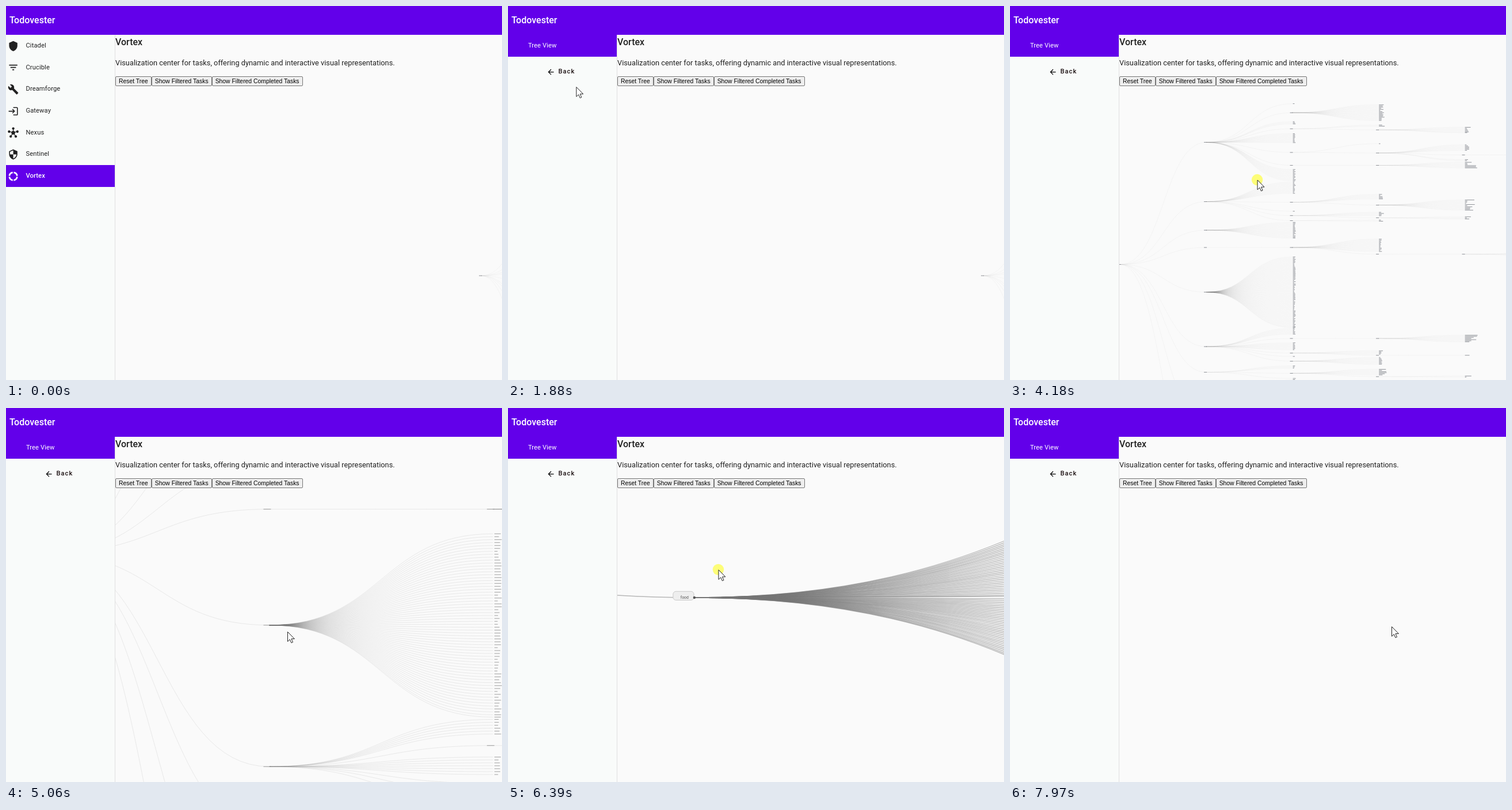
An HTML page with a canvas that plays this animation: 862x649 px, repeating every 8 s.

```html
<!DOCTYPE html>
<html lang="en">
<head>
<meta charset="utf-8">
<title>Task tree</title>
<style>
html, body { margin: 0; width: 862px; height: 649px; overflow: hidden; background: #fafafa; }
body { position: relative; font: 12.8px Roboto, sans-serif; color: #212121; }
header { height: 50px; background: #6200ea; color: #fff; font-weight: 500; font-size: 16px; line-height: 50px; padding-left: 6px; box-sizing: border-box; }
aside { position: absolute; top: 50px; left: 0; width: 189px; height: 599px; background: #f9fbfa; border-right: 1px solid #e0e0e0; font-size: 11.2px; letter-spacing: .08px; }
.row { height: 37.7px; line-height: 37.7px; padding-left: 34.5px; position: relative; }
.row svg { position: absolute; left: 3px; top: 9.5px; width: 19.2px; height: 19.2px; fill: currentColor; }
.on { background: #6200ea; color: #fff; font-weight: 500; }
#submenu .on { font-weight: 400; padding-left: 35px; }
#back { position: absolute; left: 87.5px; top: 57px; font-weight: 500; letter-spacing: 1px; line-height: 14px; color: #1c1112; }
#back svg { position: absolute; left: -21px; top: 0; width: 15px; height: 15px; }
h1, p, nav { position: absolute; left: 190px; margin: 0; white-space: nowrap; }
h1 { top: 53px; font: 500 16px/20px Roboto, sans-serif; }
p { top: 90px; line-height: 18px; }
nav { top: 122px; display: flex; }
nav span { font: 10.4px/15px "Liberation Sans", Arial, sans-serif; color: #000; background: #efefef; border: 1px solid #767676; border-radius: 2px; padding: 0 5px; }
canvas { position: absolute; left: 0; top: 0; }
[hidden] { display: none; }
</style>
</head>
<body>
<header>Todovester</header>
<aside>
  <div id="menu">
    <div class="row"><svg viewBox="0 0 24 24"><path d="M12 1 3 5v6c0 5.55 3.84 10.74 9 12 5.16-1.26 9-6.45 9-12V5z"/></svg>Citadel</div>
    <div class="row"><svg viewBox="0 0 24 24"><path d="M10 18h4v-2h-4zM3 6v2h18V6zm3 7h12v-2H6z"/></svg>Crucible</div>
    <div class="row"><svg viewBox="0 0 24 24"><path d="M22.7 19l-9.1-9.1c.9-2.3.4-5-1.5-6.9-2-2-5-2.4-7.4-1.3L9 6 6 9 1.6 4.7C.4 7.1.9 10.1 2.9 12.1c1.9 1.9 4.6 2.4 6.9 1.5l9.1 9.1c.4.4 1 .4 1.4 0l2.3-2.3c.5-.4.5-1.1.1-1.4z"/></svg>Dreamforge</div>
    <div class="row"><svg viewBox="0 0 24 24"><path d="M11 7 9.6 8.4l2.6 2.6H2v2h10.2l-2.6 2.6L11 17l5-5zm9 12h-8v2h8a2 2 0 0 0 2-2V5a2 2 0 0 0-2-2h-8v2h8z"/></svg>Gateway</div>
    <div class="row"><svg viewBox="0 0 24 24"><path d="M12 12V3M12 12 3 10M12 12l9-2M12 12l-5 8M12 12l5 8" stroke="currentColor" stroke-width="1.6"/><circle cx="12" cy="12.5" r="4"/><circle cx="12" cy="3.2" r="2.7"/><circle cx="3" cy="10" r="2.7"/><circle cx="21" cy="10" r="2.7"/><circle cx="6.5" cy="20.5" r="2.7"/><circle cx="17.5" cy="20.5" r="2.7"/></svg>Nexus</div>
    <div class="row"><svg viewBox="0 0 24 24"><path d="M12 1 3 5v6c0 5.55 3.84 10.74 9 12 5.16-1.26 9-6.45 9-12V5zm0 11h7c-.53 4.12-3.28 7.79-7 8.94V12H5V6.3l7-3.11z"/></svg>Sentinel</div>
    <div class="row on"><svg viewBox="0 0 24 24"><circle cx="12" cy="12" r="8.5" fill="none" stroke="currentColor" stroke-width="3.4" pathLength="12" stroke-dasharray="2.5 .5" stroke-dashoffset="-.25"/></svg>Vortex</div>
  </div>
  <div id="submenu" hidden>
    <div class="row on">Tree View</div>
    <div id="back"><svg viewBox="0 0 24 24"><path d="M20 11H7.8l5.6-5.6L12 4l-8 8 8 8 1.4-1.4L7.8 13H20z"/></svg>Back</div>
  </div>
</aside>
<h1>Vortex</h1>
<p>Visualization center for tasks, offering dynamic and interactive visual representations.</p>
<nav><span>Reset Tree</span><span>Show Filtered Tasks</span><span>Show Filtered Completed Tasks</span></nav>
<canvas id="stage" width="862" height="649"></canvas>
<script>
const LOOP = 8000, COLUMN = 149.5, PITCH = 1.95;
const ctx = document.getElementById('stage').getContext('2d');
const menu = document.getElementById('menu'), submenu = document.getElementById('submenu');

let seed = 7;
function random() {
  seed = (seed * 16807) % 2147483647;
  return seed / 2147483647;
}

// Tree coordinates have the "food" node at the origin.
// A node fills its span with leaves and, by chance, with taller subtrees.
function grow(depth, top, bottom, chance) {
  const node = { depth, y: (top + bottom) / 2, children: [] };
  const longest = 3 + 14 * (depth - 1) * random() ** 1.5;
  for (let y = top; y < bottom - 1;) {
    const isParent = random() < chance;
    const size = Math.min(isParent ? 6 + 32 * random() : PITCH, bottom - y);
    node.children.push(isParent
      ? grow(depth + 1, y, y + size, chance / 3)
      : { depth: depth + 1, y: y + size / 2, length: 2 + longest * random() });
    y += size;
  }
  return node;
}

const edges = [-328, -192, -122, -93, -62, 62, 127, 151, 295, 420];
const root = { depth: 0, y: -48, children: [] };
for (let i = 1; i < edges.length; i++) {
  const isFood = edges[i] === -edges[i - 1];
  root.children.push(grow(1, edges[i - 1], edges[i], isFood ? 0 : .25));
}

// Pointer moves: start, end, target x and y, then drag (press) or a zoom factor.
const DRAG = 'drag';
const moves = [
  [260, 600, 335, 328], [600, 870, 65, 292], [1140, 1210, 65, 292, DRAG],
  [1470, 1880, 118, 140], [1880, 2090, 190, 165], [2240, 3010, 708, 318],
  [3150, 3700, 256, 330, DRAG], [3710, 3960, 612, 333],
  [3960, 4180, 429, 302, DRAG], [4180, 4420, 565.5, 188.7, DRAG],
  [4420, 4530, 489, 388], [4530, 5990, 489, 388, 13.8], [5990, 6330, 365, 280],
  [6390, 6950, 627, 482, DRAG], [7210, 7600, 663, 379], [7600, 7850, 663, 379, 4.35]
];

function stateAt(t) {
  let x = 748, y = 554, fx = 975.5, fy = 516, k = 1, pressed = false;
  for (const [start, end, toX, toY, action] of moves) {
    if (t < start) break;
    const f = Math.min(1, (t - start) / (end - start));
    const dx = (toX - x) * f, dy = (toY - y) * f;
    x += dx;
    y += dy;
    pressed = action === DRAG && t < end;
    if (action === DRAG) {
      fx += dx;
      fy += dy;
    } else if (action) {
      const zoom = action ** f;
      fx = x + (fx - x) * zoom;
      fy = y + (fy - y) * zoom;
      k *= zoom;
    }
  }
  return { x, y, fx, fy, k, pressed };
}

function drawTree({ fx, fy, k }) {
  const px = depth => fx + (depth - 1) * COLUMN * k;
  const py = y => fy + y * k;

  function drawLink(from, to) {
    const x0 = px(from.depth), x1 = px(to.depth), mid = (x0 + x1) / 2;
    if (x0 > 862 || x1 < 190) return;
    ctx.beginPath();
    ctx.moveTo(x0, py(from.y));
    ctx.bezierCurveTo(mid, py(from.y), mid, py(to.y), x1, py(to.y));
    ctx.stroke();
  }
  function drawLabel(node, offset, length) {
    const h = Math.max(.75, .45 * k);
    ctx.fillRect(px(node.depth) + offset * k, py(node.y) - h / 2, length * k, h);
  }
  function drawNode(node) {
    if (!node.children) return drawLabel(node, 1, node.length);
    if (node.y || k < 3) drawLabel(node, -4, 5);
    for (const child of node.children) {
      drawLink(node, child);
      drawNode(child);
    }
  }

  ctx.save();
  ctx.beginPath();
  ctx.rect(190, 139, 672, 510);
  ctx.clip();
  ctx.lineWidth = .1 * k;
  ctx.strokeStyle = 'rgba(118,118,118,.5)';
  ctx.fillStyle = k < 2 ? 'rgba(65,70,80,.75)' : 'rgba(80,80,80,.45)';
  drawNode(root);
  if (k >= 3) drawFood(fx, fy, k);
  ctx.restore();
}

function drawFood(x, y, k) {
  ctx.beginPath();
  ctx.roundRect(x - 2.68 * k, y - .78 * k, 2.62 * k, 1.1 * k, .36 * k);
  ctx.fillStyle = '#eee';
  ctx.fill();
  ctx.strokeStyle = '#c8c8c8';
  ctx.lineWidth = .07 * k;
  ctx.stroke();
  ctx.fillStyle = '#555';
  ctx.beginPath();
  ctx.arc(x, y, .16 * k, 0, 7);
  ctx.fill();
  ctx.font = `${.5 * k}px Roboto, sans-serif`;
  ctx.textAlign = 'right';
  ctx.fillText('food', x - .72 * k, y + .17 * k);
}

const arrow = new Path2D('M.5 .5V17.2L4.3 13.6 6.9 19.5 9.5 18.4 7 12.6H12.4Z');

function drawPointer({ x, y, pressed }) {
  if (pressed) {
    ctx.fillStyle = 'rgba(255,255,0,.52)';
    ctx.beginPath();
    ctx.arc(x, y, 9.7, 0, 7);
    ctx.fill();
  }
  ctx.save();
  ctx.translate(x, y);
  ctx.fillStyle = '#fff';
  ctx.fill(arrow);
  ctx.strokeStyle = '#222';
  ctx.lineWidth = 1;
  ctx.stroke(arrow);
  ctx.restore();
}

function draw(now) {
  const t = now % LOOP, state = stateAt(t);
  menu.hidden = t >= 1210;
  submenu.hidden = !menu.hidden;
  ctx.clearRect(0, 0, 862, 649);
  drawTree(state);
  if (t >= 260) drawPointer(state);
  requestAnimationFrame(draw);
}
requestAnimationFrame(draw);
</script>
</body>
</html>
```
